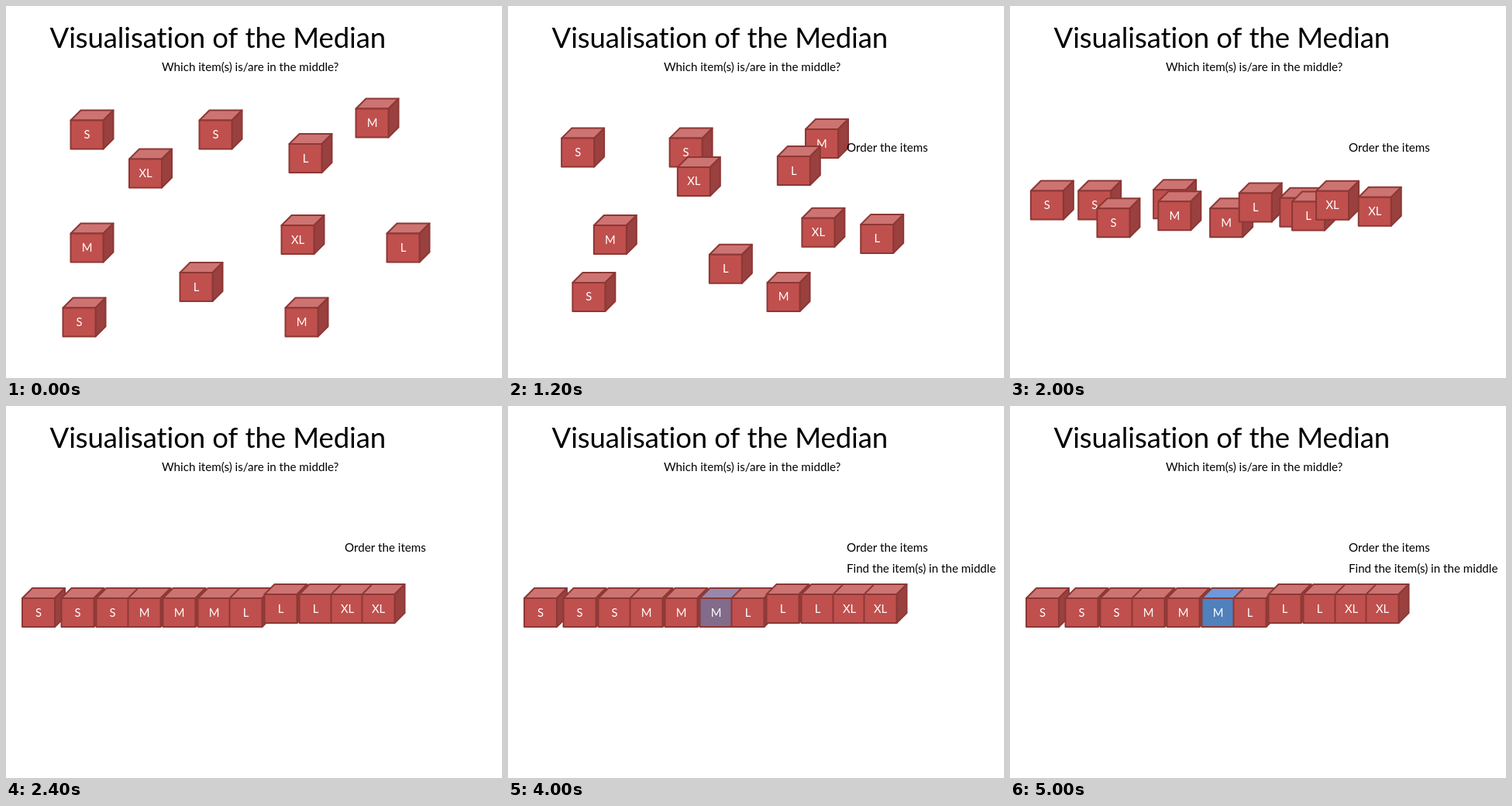
These frames come from a looping animation (640 by 480 pixels, 5100 ms). An HTML page with a canvas:

```html
<!DOCTYPE html>
<html lang="en">
<head>
<meta charset="utf-8">
<title>Visualisation of the Median</title>
<style>
  html, body { margin: 0; width: 100%; height: 100%; overflow: hidden; background: #fff; }
  canvas { display: block; }
</style>
</head>
<body>
<canvas id="stage" width="640" height="480"></canvas>
<script>
const ctx = document.getElementById('stage').getContext('2d');
const LOOP = 5100, STEP = 100;
const RED = { front: [192, 80, 77], top: [205, 115, 113], side: [154, 64, 62] };
const BLUE = { front: [79, 129, 189], top: [110, 153, 220], side: [63, 103, 151] };
const EDGE = '#8c3836';
const MEDIAN = 5;

// label, start centre x and y, end centre x and y of the front face, back to front
const cubes = [
  ['S', 104.5, 166, 42, 266.5],
  ['S', 270.5, 166, 92.5, 266.5],
  ['S', 94.5, 408, 137.5, 266.5],
  ['M', 472.5, 151, 178.5, 266.5],
  ['M', 104.5, 312, 223.5, 266.5],
  ['M', 381.5, 408, 268.5, 266.5],
  ['L', 386.5, 196.5, 309.5, 266.5],
  ['L', 512.5, 312, 354.5, 261.5],
  ['L', 245.5, 362.5, 399.5, 261.5],
  ['XL', 180, 216, 440.5, 261.5],
  ['XL', 376.5, 301.5, 480.5, 261.5]
];

const progress = (t, start, length) => Math.min(1, Math.max(0, (t - start) / length));
const ease = u => u < 0.5 ? 2 * u * u : 1 - 2 * (1 - u) ** 2;
const lerp = (a, b, k) => a + (b - a) * k;
const mix = (a, b, k) => `rgb(${a.map((v, i) => Math.round(lerp(v, b[i], k)))})`;

function text(str, x, y, size, alpha = 1, color = '#000', align = 'left') {
  ctx.globalAlpha = alpha;
  ctx.font = `${size}px Lato, sans-serif`;
  ctx.fillStyle = color;
  ctx.textAlign = align;
  ctx.fillText(str, x, y);
  ctx.globalAlpha = 1;
}

function face(color, ...points) {
  ctx.beginPath();
  points.forEach(([x, y]) => ctx.lineTo(x, y));
  ctx.closePath();
  ctx.fillStyle = color;
  ctx.fill();
  ctx.stroke();
}

function cube(label, cx, cy, tint) {
  const l = cx - 21, r = cx + 21, t = cy - 18.5, b = cy + 18.5, d = 13;
  const color = part => mix(RED[part], BLUE[part], tint);
  ctx.strokeStyle = EDGE;
  ctx.lineWidth = 2;
  ctx.lineJoin = 'round';
  face(color('top'), [l, t], [l + d, t - d], [r + d, t - d], [r, t]);
  face(color('side'), [r, t], [r + d, t - d], [r + d, b - d], [r, b]);
  face(color('front'), [l, t], [r, t], [r, b], [l, b]);
  text(label, cx, cy + 5, 14.8, 1, '#fff', 'center');
}

function draw(t) {
  ctx.fillStyle = '#fff';
  ctx.fillRect(0, 0, 640, 480);
  ctx.letterSpacing = '-0.12px';
  text('Visualisation of the Median', 56.5, 54, 36.6);
  ctx.letterSpacing = '0px';
  text('Which item(s) is/are in the middle?', 201, 84, 15.15);

  const move = ease(progress(t, 590, 1800));
  const tint = progress(t, 2950, 1900);
  cubes.forEach(([label, x0, y0, x1, y1], i) =>
    cube(label, lerp(x0, x1, move), lerp(y0, y1, move), i === MEDIAN ? tint : 0));

  text('Order the items', 437, 187.5, 15.15, progress(t, 120, 470));
  text('Find the item(s) in the middle', 437, 215, 15.15, progress(t, 2480, 470));
}

function tick() {
  const t = performance.now() % LOOP;
  draw(Math.floor(t / STEP) * STEP);
  requestAnimationFrame(tick);
}
tick();
</script>
</body>
</html>
```
